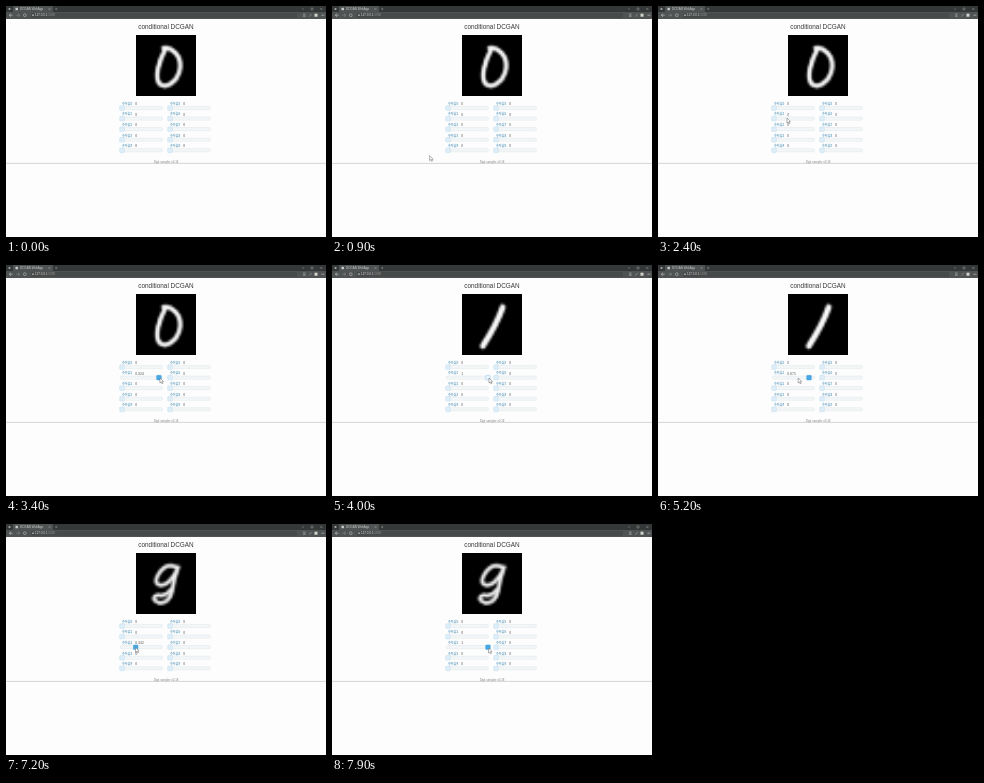
These frames come from a looping animation (320 by 231 pixels, 8 s). An HTML page with a canvas:

```html
<!DOCTYPE html>
<html lang="ko">
<head>
<meta charset="utf-8">
<title>DCGAN WebApp</title>
<style>
html, body { margin: 0; width: 100%; height: 100%; overflow: hidden; background: #fdfdfd; }
svg, canvas { position: absolute; left: 0; top: 0; }
canvas { left: 129.5px; top: 29px; width: 60.5px; height: 60.5px; }
text { font-family: "Liberation Sans", Arial, sans-serif; }
.name { font: bold 3.1px "Noto Sans CJK KR", "Noto Sans CJK", sans-serif; fill: #74a9c6; }
.value { font-size: 3.4px; fill: #555; }
</style>
</head>
<body>
<svg id="page" width="320" height="231" viewBox="0 0 320 231"></svg>
<canvas id="digit" width="28" height="28"></canvas>
<svg id="top" width="320" height="231" viewBox="0 0 320 231"></svg>
<script>
const LOOP = 8000, STEP = 100, TRAVEL = 40;
const page = document.getElementById('page');
const ctx = document.getElementById('digit').getContext('2d');

function add(parent, tag, attrs, text) {
  const el = document.createElementNS('http://www.w3.org/2000/svg', tag);
  for (const key in attrs) el.setAttribute(key, attrs[key]);
  if (text !== undefined) el.textContent = text;
  parent.appendChild(el);
  return el;
}
const rect = (x, y, width, height, fill, more) =>
  add(page, 'rect', { x, y, width, height, fill, ...more });
const line = (d, stroke, width = 0.6) =>
  add(page, 'path', { d, stroke, 'stroke-width': width, fill: 'none' });
const label = (x, y, size, fill, text, anchor = 'start') =>
  add(page, 'text', { x, y, 'font-size': size, fill, 'text-anchor': anchor }, text);

// Browser frame
rect(0, 0, 320, 6, '#353838');
rect(7, 0, 40, 6, '#505353');
rect(0, 6, 320, 7, '#505353');
rect(25, 7, 266, 4.8, '#474a4a');
add(page, 'circle', { cx: 3.5, cy: 3, r: 1.1, fill: '#aaa' });
rect(9.5, 1.8, 2.4, 2.4, '#ccc');
label(14, 4.1, 3, '#ccc', 'DCGAN WebApp');
line('M42.5 2l2 2m0-2l-2 2M49 3h2.4m-1.2-1.2v2.4', '#aaa', 0.4);
line('M5 7.6L3.3 9.2 5 10.8M3.3 9.2h3.4', '#ccc');
line('M12 7.6l1.7 1.6-1.7 1.6M10.3 9.2h3.4', '#888');
add(page, 'circle', { cx: 18.8, cy: 9.2, r: 1.4, fill: 'none', stroke: '#bbb', 'stroke-width': 0.6 });
add(page, 'circle', { cx: 27, cy: 9.2, r: 0.9, fill: '#aaa' });
label(29, 10.4, 3, '#ddd', '127.0.0.1').insertAdjacentHTML('beforeend', '<tspan fill="#999">:5000</tspan>');
line('M297 8h2.6m-2.6 1.2h2.6m-2.6 1.2h2.6M303.5 10.6l2-2.6', '#bbb', 0.5);
rect(308.5, 7.7, 3, 3, '#d4d4cc');
line('M315.4 9.2h3', '#bbb', 0.7);
line('M296 3h2M305 2h2v2h-2zM314.3 2l2 2m0-2l-2 2', '#aaa', 0.4);

// Page text
label(160, 22.8, 6.4, '#3a3a3a', 'conditional DCGAN', 'middle');
line('M0 157.4H320', '#c4c4c4', 0.7);
label(160, 157.2, 2.9, '#888', 'Digit sampler v0.18', 'middle');

const LOOKS = {
  normal: ['#deeef9', '#c0dcee'],
  hover: ['#e8f3fb', '#94c3e6'],
  active: ['#46a9e4', '#3a9fe4']
};
const sliders = Array.from({ length: 10 }, (_, i) => {
  const x = i < 5 ? 116 : 164, y = 101.9 + (i % 5) * 10.57;
  add(page, 'text', { x, y: y - 3, class: 'name' }, '숫자값' + i);
  const value = add(page, 'text', { x: x + 13.3, y: y - 2.9, class: 'value' }, '0');
  rect(x - 1.7, y - 1.5, 42, 3.2, '#f3f6f7', { rx: 0.7, stroke: '#dfe4e7', 'stroke-width': 0.5 });
  const knob = rect(0, y - 2.1, 4.6, 4.6, '', { rx: 0.7, 'stroke-width': 0.5 });
  return { x, value, knob };
});

function setSlider(slider, amount, look) {
  const [fill, stroke] = LOOKS[look];
  slider.knob.setAttribute('x', slider.x + amount * TRAVEL - 2.3);
  slider.knob.setAttribute('fill', fill);
  slider.knob.setAttribute('stroke', stroke);
  slider.value.textContent = String(+amount.toFixed(3));
}
sliders.forEach(s => setSlider(s, 0, 'normal'));

// Digit strokes in stage coordinates
const DIGITS = [
  { d: 'M157 42C164 40 178 49 173 66C170 76 160 82 154 78C147 72 153 54 159 43', width: 3.6, light: 1 },
  { d: 'M170.5 42Q165 58 150.5 80.5', width: 5, light: 1 },
  { d: 'M170 43C162 39 155 44 151 52C146 62 157 63 163 57Q169 51 172 43Q167 56 166 66C165 74 159 80 152 78C144 75 148 70 154 71Q160 72 166 64', width: 3.2, light: 0.85 }
];
function drawDigit({ d, width, light }) {
  const path = new Path2D(d), k = 28 / 60.5;
  ctx.setTransform(1, 0, 0, 1, 0, 0);
  ctx.fillStyle = '#000';
  ctx.fillRect(0, 0, 28, 28);
  ctx.setTransform(k, 0, 0, k, -129.5 * k, -29 * k);
  ctx.lineCap = ctx.lineJoin = 'round';
  for (let grow = 2; grow >= -1; grow--) {
    ctx.lineWidth = width + grow;
    ctx.strokeStyle = `rgba(255,255,255,${light * (0.65 - grow * 0.22)})`;
    ctx.stroke(path);
  }
}

const cursor = add(document.getElementById('top'), 'path', {
  d: 'M0 0V5L1.2 4 2 5.8 2.9 5.4 2.1 3.7H3.6Z', fill: '#fff', stroke: '#666', 'stroke-width': 0.5
});

const ramp = (t, from, to) => Math.min(1, Math.max(0, (t - from) / (to - from)));
const easeOut = k => Math.sin(k * Math.PI / 2);
const easeIn = k => k ** 1.5;
const within = (t, from, to) => t >= from && t < to;

// Pointer moves: begin, end, x, y
const MOVES = [
  [100, 300, 75, 140], [300, 400, 94, 170],
  [700, 1700, 105.5, 104], [1700, 2100, 159, 112], [2100, 2700, 116.5, 112],
  [2800, 3600, 157, 113], [5000, 5800, 113, 113],
  [6100, 6900, 115.5, 123], [7000, 7900, 156.5, 124]
];
function pointerAt(t) {
  let x = 306, y = 10;
  for (const [from, to, nextX, nextY] of MOVES) {
    const k = easeOut(ramp(t, from, to));
    x += (nextX - x) * k;
    y += (nextY - y) * k;
  }
  return [x, y];
}
const look = (pressed, near) => pressed ? 'active' : near ? 'hover' : 'normal';

let shown = -1;
function render(t) {
  const [x, y] = pointerAt(t);
  cursor.setAttribute('transform', `translate(${x} ${y})`);
  cursor.setAttribute('visibility', t < 100 ? 'hidden' : 'visible');

  const first = easeOut(ramp(t, 2800, 3600)) - easeIn(ramp(t, 5000, 5800));
  const pressed = within(t, 2900, 3800) || within(t, 5100, 6200);
  setSlider(sliders[1], first, look(pressed, within(t, 2600, 6800)));
  setSlider(sliders[2], easeOut(ramp(t, 7000, 7900)), look(t >= 7100, t >= 6900));

  const next = (t >= 3900) + (t >= 6200);
  if (next !== shown) drawDigit(DIGITS[shown = next]);
}

const start = performance.now();
function tick() {
  const t = (performance.now() - start) % LOOP;
  render(Math.floor(t / STEP) * STEP);
  requestAnimationFrame(tick);
}
tick();
</script>
</body>
</html>
```
